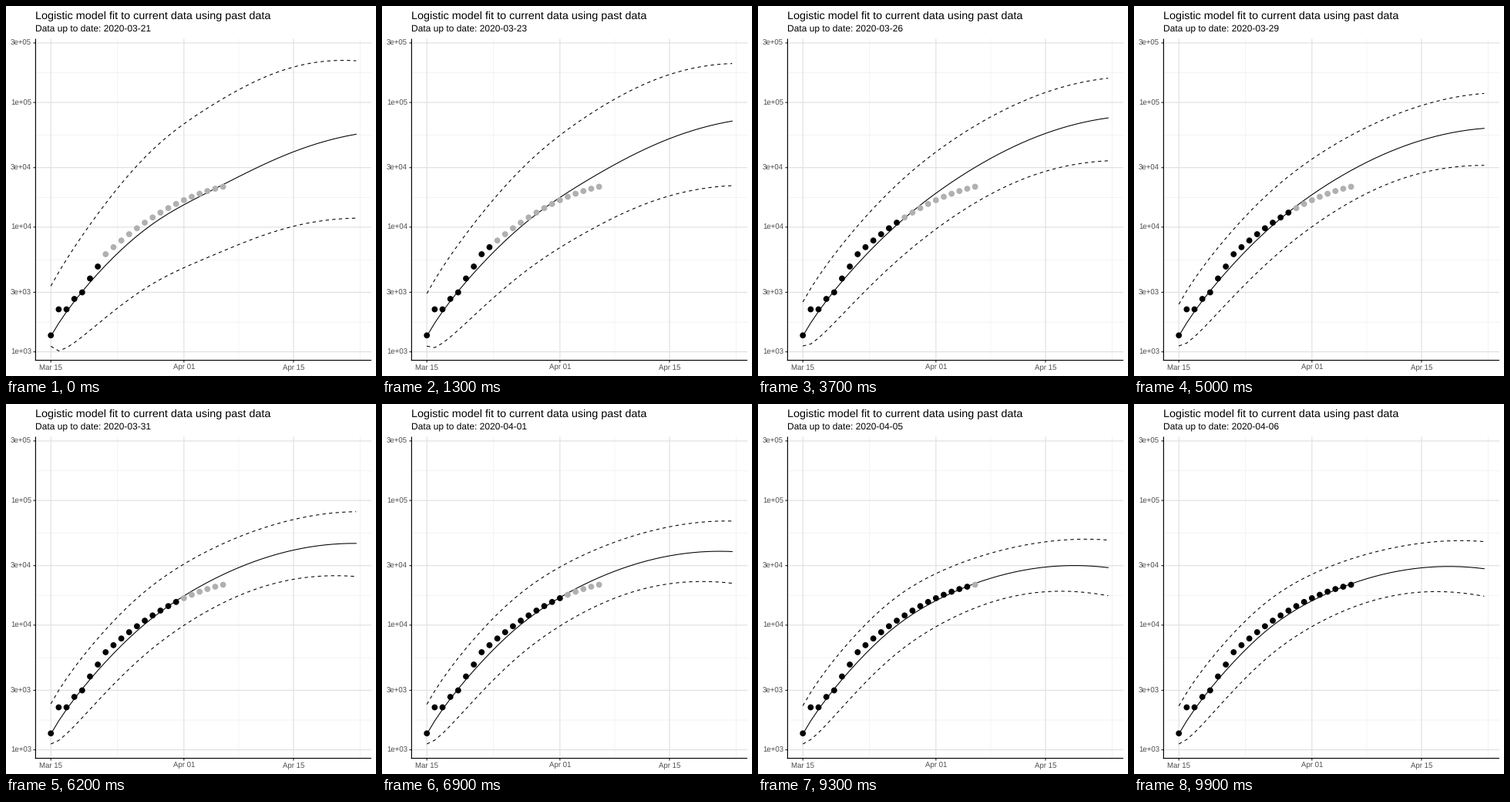
Write a matplotlib script that moves like this. It is 480 by 480 pixels and loops after 10 s.

```python
import numpy as np
import matplotlib.pyplot as plt
from matplotlib.animation import FuncAnimation

SIZE, FRAMES, INTERVAL = 480, 100, 100
LAST = 16                                # day steps after the first date
STEP = (FRAMES - 1) / LAST               # frames per day step
LEFT, RIGHT, TOP, BOTTOM = 38.4, 474, 42.5, 459.6
DAY = (RIGHT - LEFT) / 1.1 / 39          # 39 days with 5% padding on both sides
X0 = LEFT + (RIGHT - LEFT) / 22
Y3, DECADE = 448.6, 161.75               # height of 1e3 and pixels per decade

plt.rcParams.update({"font.family": "Liberation Sans", "text.hinting": "none"})

days = np.arange(40)

# Observed cases: an uneven first week, then a slowing rise
week = [427.3, 393.5, 393.5, 380, 371.5, 353.5, 338]
later = np.arange(7, 23)
cases = np.append(week, 322 - 7.714 * (later - 7) + 0.235 * (later - 7) * (later - 14))


def day_x(day):
    return X0 + DAY * np.asarray(day)


def value_y(value):
    return Y3 - DECADE * (np.log10(value) - 3)


def sigmoid(x):
    return 1 / (1 + np.exp(-x))


def fit(step):
    """Heights of the upper bound, the estimate and the lower bound."""
    t = days
    early = np.exp(-step / 3)            # first fits run low
    flatten = sigmoid(0.56 * (step - 9.4))
    doubt = np.exp(-step / 5)            # bounds tighten as data comes in

    middle = (418 - 13.05 * t + 0.1446 * t ** 2 + 10 * np.exp(-t / 2)
              + 37 * early * sigmoid((t - 16.5) / 3.5)
              + 6.3 * flatten * np.log1p(np.exp((t - 11.5) / 2)))
    gap = 32 + 4 * np.cos(2 * np.pi * t / 44 - 0.7)
    above = gap + doubt * (30 + 55 * np.sin(np.pi * t / 52) ** 1.5)
    below = gap - 22 * np.exp(-t / 1.6) + 12.2 * doubt * np.sqrt(t)
    return middle - above, middle, middle + below


def date_text(step):
    day = 21 + step
    month, day = (3, day) if day <= 31 else (4, day - 31)
    return f"Data up to date: 2020-{month:02d}-{day:02d}"


fig = plt.figure(figsize=(SIZE / 72, SIZE / 72), dpi=72, facecolor="white")
ax = fig.add_axes([0, 0, 1, 1])
ax.set_xlim(0, SIZE)
ax.set_ylim(SIZE, 0)
ax.axis("off")


def rule(xs, ys, color, width, z):
    ax.plot(xs, ys, color=color, lw=width, zorder=z, snap=False,
            solid_capstyle="butt")


def grid(xs, ys, color, width, z):
    for x in xs:
        rule([x, x], [TOP, BOTTOM], color, width, z)
    for y in ys:
        rule([LEFT, RIGHT], [y, y], color, width, z)


def label(x, y, text, size, color="black", ha="left"):
    return ax.text(x, y, text, size=size, color=color, ha=ha, va="baseline")


ticks_x = {"Mar 15": day_x(0), "Apr 01": day_x(17), "Apr 15": day_x(31)}
ticks_y = {f"{m}e+0{e}": value_y(m * 10 ** e)
           for e in (3, 4, 5) for m in (1, 3)}
major_y = np.array(list(ticks_y.values()))

grid(day_x([8.5, 24, 39.5]), (major_y[1:] + major_y[:-1]) / 2, "#ebebeb", 0.58, 1)
grid(ticks_x.values(), major_y, "#e0e0e0", 1.16, 2)

for text, x in ticks_x.items():
    rule([x, x], [BOTTOM, BOTTOM + 3], "#333333", 1.16, 6)
    label(x, 472.4, text, 9.6, "#4d4d4d", "center")
for text, y in ticks_y.items():
    rule([LEFT - 3, LEFT], [y, y], "#333333", 1.16, 6)
    label(33, y + 3.4, text, 9.6, "#4d4d4d", "right")
rule([LEFT, LEFT], [TOP, BOTTOM + 0.58], "black", 1.16, 7)
rule([LEFT - 0.58, RIGHT], [BOTTOM, BOTTOM], "black", 1.16, 7)

label(LEFT, 17, "Logistic model fit to current data using past data", 14.4)
subtitle = label(LEFT, 34, "", 12)

dashed = (0, (4, 4))
lines = [ax.plot([], [], color="black", lw=1.07, ls=style, zorder=4)[0]
         for style in (dashed, "-", dashed)]
dots = ax.scatter(day_x(np.arange(len(cases))), cases, s=7.8 ** 2,
                  linewidths=0, zorder=5)


def draw(frame):
    # The data switches at the nearest frame, the date only once it is reached
    step = int((frame + 0.5) / STEP + 1e-9)
    for line, heights in zip(lines, fit(step)):
        line.set_data(day_x(days), heights)
    dots.set_facecolor(["black" if i <= step + 6 else "#b0b0b0"
                        for i in range(len(cases))])
    subtitle.set_text(date_text(int(frame / STEP + 1e-9)))
    return lines + [dots, subtitle]


anim = FuncAnimation(fig, draw, frames=FRAMES, interval=INTERVAL,
                     repeat=True, repeat_delay=0)
plt.show()
```
